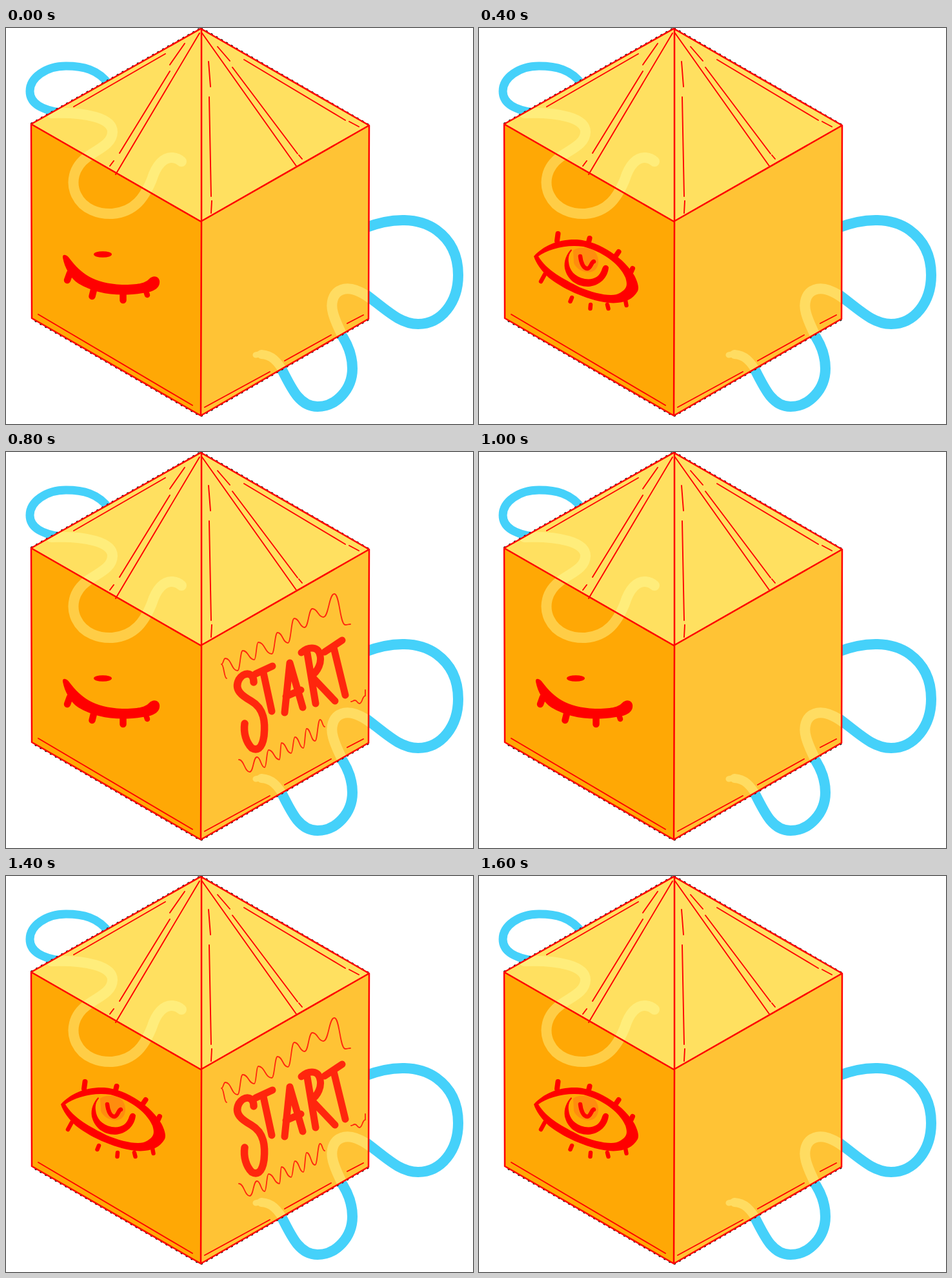
An HTML page for the animation above (1.8 s loop, 724x614 px).

```html
<!DOCTYPE html>
<html lang="en">
<head>
<meta charset="utf-8">
<title>Cube</title>
<style>
  html, body { margin: 0; width: 724px; height: 614px; overflow: hidden; background: #fff; }
  svg { display: block; }
  .line { fill: none; stroke: #f00; stroke-linecap: round; stroke-linejoin: round; }
  .rope { fill: none; stroke: #45d1fa; stroke-width: 16; }
  .glow { fill: none; stroke: #ffffa0; stroke-width: 16; stroke-linecap: round; stroke-linejoin: round; }
  .ink { fill: #f00; }
</style>
</head>
<body>
<svg width="724" height="614" viewBox="0 0 724 614">
  <clipPath id="cube"><path d="M302 1L563 151L562 451L302 601L40 450L39 149Z"/></clipPath>

  <!-- rope outside the cube -->
  <g class="rope">
    <path stroke-width="13" style="stroke-width:13" d="M160 88C143 64 119 59 93 59C62 59 37 77 37 98C37 118 56 127 84 131"/>
    <path d="M556 310C600 293 640 294 667 313C692 331 701 355 701 383C701 425 675 459 639 459C610 459 590 437 556 412"/>
    <path d="M516 470C531 490 537 510 537 528C537 560 512 587 483 587C455 587 443 560 425 524"/>
  </g>

  <!-- faces -->
  <path fill="#ffe060" d="M302 1L563 151L302 300L39 149Z"/>
  <path fill="#ffa805" d="M39 149L302 300L302 601L40 450Z"/>
  <path fill="#ffc335" d="M302 300L563 151L562 451L302 601Z"/>

  <g id="closed">
    <ellipse class="ink" cx="150" cy="351" rx="14" ry="4.8"/>
    <path class="ink" d="M88 356C87 350 94 350 99 358C116 380 135 396 180 398C205 398 215 396 222 389C230 381 240 387 238 396C236 407 222 410 212 411C175 417 140 413 112 396C100 388 91 372 88 356Z"/>
    <path class="line" stroke-width="10.5" d="M99 380L95 391M136 406L133.500 416M181.500 412V422"/>
    <path class="line" stroke-width="8.500" d="M217 408L219 414"/>
  </g>

  <g id="open">
    <path class="ink" fill-rule="evenodd" d="M85 354C100 337 124 327 152 328C189 331 226 358 241 384C245 392 249 402 246 408C238 422 223 428 200 426C166 422 126 402 108 387C97 377 88 364 85 354ZM92 354C105 376 131 389 156 402C180 412 208 418 218 411C231 404 230 397 227 387C217 364 189 346 162 339C135 335 107 343 92 354Z"/>
    <path fill="#ff8c0e" d="M146 345C153 339 168 339 178 345C188 355 187 372 177 377C165 382 150 374 147 364Z"/>
    <path class="ink" d="M143 343C136 350 131 361 133 373C137 390 151 401 169 401C187 400 200 387 201 371C198 366 193 367 191 373C187 387 176 391 164 389C148 386 140 375 139 363C138 355 140 349 144 345Z"/>
    <path class="line" stroke-width="6.500" d="M157 354C158 364 162 373 168 373C173 373 174 363 178 362"/>
    <path class="line" stroke-width="8" d="M122.500 319L121 330M171.500 326L169.500 334M216.500 347L211 355M238 373L234 382"/>
    <path class="line" stroke-width="6.500" d="M102 382L96 393M144 418L141.500 424M173 429L172.500 435M199 429L200.500 435M227 422L228.500 430"/>
  </g>

  <g id="start" role="img" aria-label="START" class="line" style="stroke:#ff260d">
    <path stroke-width="11.500" d="M384 357C384 340 368 341 361 353C353 369 366 378 380 386C401 398 402 420 400 440C397 462 388 463 381 459C372 450 368 435 370 421"/>
    <path stroke-width="11" d="M387 344L413 332M399 342L412 402M440 327L432 404M440 327L460 396M434 379L457 369"/>
    <path stroke-width="11" d="M467 312L480 390M458 311C468 302 482 301 486 312C491 326 483 341 473 347L510 386"/>
    <path stroke-width="11" d="M494 310L521 292M508 303L526 377"/>
  </g>

  <!-- rope showing through -->
  <g clip-path="url(#cube)"><g class="glow" opacity=".42">
    <path d="M70 132C125 130 165 140 165 161C165 180 142 188 126 200C104 216 100 240 109 259C120 282 145 289 165 288C200 285 215 262 226 235C233 212 245 200 258 201C266 202 270 205 272 207"/>
    <path d="M570 423C545 403 530 402 520 406C506 411 503 428 507 442C511 457 517 468 526 486"/>
    <path style="stroke-width:14" d="M434 540C421 514 410 507 396 506"/>
    <path style="stroke-width:9" d="M396 505L387 507"/>
  </g></g>

  <!-- edges and pen lines -->
  <path fill="none" stroke="#111" stroke-width="2.600" stroke-dasharray="3 6" d="M302 0L563 150.500M562 452L302 602L40 451M38.500 148.500L302 0"/>
  <g class="line">
    <path stroke-width="2.500" d="M302 1L563 151L562 451L302 601L40 450L39 149ZM39 149L302 300L563 151M303 2V300L302 601"/>
    <path stroke-width="1.900" d="M247 40L105 122M277 24L254 57M254 67L176 194M300 8L170 227M167 206L161 214M314 52L317 91M315 107L318 261M319 268L318 287M304 8L450 214M328 29L347 51M351 61L452 195M454 197L459 203M369 49L526 143M532 145L547 153"/>
    <path stroke-width="1.900" d="M50 444L289 585M308 588L409 533M432 516L504 476M529 458L554 445"/>
  </g>
</svg>
<script>
  const $ = id => document.getElementById(id);

  // Wavy line whose turning points are given as x, y pairs.
  function wave(...p) {
    let d = `M${p[0]} ${p[1]}`;
    for (let i = 2; i < p.length; i += 2) {
      const mid = (p[i - 2] + p[i]) / 2;
      d += `C${mid} ${p[i - 1]} ${mid} ${p[i + 1]} ${p[i]} ${p[i + 1]}`;
    }
    const path = document.createElementNS("http://www.w3.org/2000/svg", "path");
    path.setAttribute("d", d);
    path.setAttribute("stroke-width", 1.8);
    $("start").append(path);
  }
  wave(342, 351, 334, 329, 340, 320, 359, 339, 367, 308, 385, 322, 391, 295, 412, 313, 421, 280,
    437, 296, 447, 258, 463, 272, 475, 243, 492, 256, 509, 220, 526, 268, 534, 267);
  wave(361, 477, 378, 496, 389, 473, 401, 489, 407, 462, 424, 477, 427, 451, 442, 467, 448, 442,
    461, 459, 466, 429, 479, 448, 487, 415, 494, 426);
  wave(535, 387, 541, 385, 548, 390, 557, 378, 557, 369);

  // One entry per 200 ms.
  const eyeOpen = [0, 0, 1, 1, 0, 0, 1, 1, 1];
  const startOn = [0, 0, 0, 1, 1, 0, 0, 1, 0];
  const show = (id, on) => $(id).style.display = on ? "" : "none";

  function draw() {
    const step = Math.floor(performance.now() % 1800 / 200);
    show("open", eyeOpen[step]);
    show("closed", !eyeOpen[step]);
    show("start", startOn[step]);
    requestAnimationFrame(draw);
  }
  draw();
</script>
</body>
</html>
```
